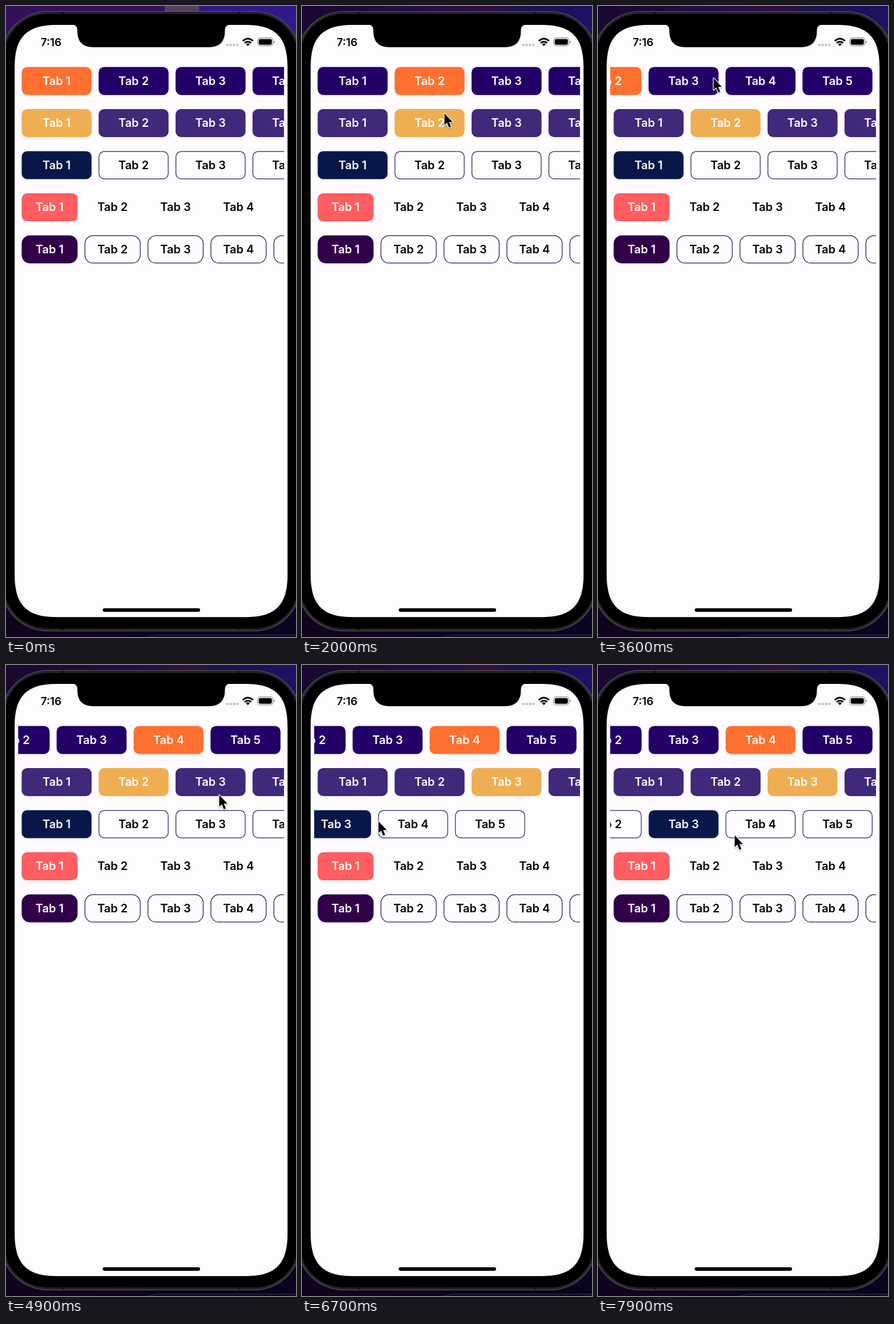
These frames come from a looping animation (508 by 1102 pixels, 8000 ms). An HTML page:

```html
<!DOCTYPE html>
<html lang="en">
<head>
<meta charset="utf-8">
<title>Tab rows</title>
<style>
  html, body { margin: 0; width: 100%; height: 100%; overflow: hidden; background: #0b0418; }
  svg { display: block; width: 508px; height: 1102px; }
  text { font: 600 20px Inter, "Noto Sans", sans-serif; text-anchor: middle; }
</style>
</head>
<body>
<svg viewBox="0 0 508 1102" xmlns="http://www.w3.org/2000/svg">
  <defs>
    <linearGradient id="sky">
      <stop offset="0" stop-color="#190730"/>
      <stop offset=".45" stop-color="#270b48"/>
      <stop offset=".65" stop-color="#330f42"/>
      <stop offset=".75" stop-color="#19124e"/>
      <stop offset="1" stop-color="#1f1066"/>
    </linearGradient>
    <linearGradient id="floor">
      <stop offset="0" stop-color="#12041f"/>
      <stop offset="1" stop-color="#0b0420"/>
    </linearGradient>
    <clipPath id="view"><rect x="21.3" y="90" width="465.7" height="380"/></clipPath>
    <filter id="soft" x="-50%" y="-50%" width="200%" height="200%">
      <feDropShadow dx="0" dy="1.5" stdDeviation="1.3" flood-opacity=".35"/>
    </filter>
  </defs>

  <!-- desktop -->
  <rect width="508" height="551" fill="url(#sky)"/>
  <rect y="551" width="508" height="551" fill="url(#floor)"/>
  <g id="glow">
    <rect width="278" height="60" fill="#35105a"/>
    <rect x="278" width="60" height="9" fill="#55405f"/>
    <rect x="338" width="170" height="60" fill="#32198a"/>
  </g>
  <path d="M248 1103Q258 1098.5 274 1098.5H508V1103Z" fill="#0c0a20" stroke="#302b52"/>

  <!-- phone -->
  <rect x="-8.5" y="9.5" width="525" height="1082" rx="82" fill="#232325" stroke="#59595c" stroke-width="1.2"/>
  <path d="M97 10h5v4h-5zM406 10h5v4h-5zM97 1087h5v4h-5zM406 1087h5v4h-5z" fill="#141416"/>
  <rect x="-4" y="14" width="516" height="1073" rx="77"/>
  <path id="screen" fill="#fefcff"/>
  <path d="M116 32.5Q125 33 125 42V44Q125 72 153 72H355Q383.5 72 383.5 44V42Q383.5 33 393 32.5Z"/>

  <!-- status bar -->
  <text x="79" y="70" style="font-size:19px">7:16</text>
  <path d="M388 66v4m5.7-4v4m5.7-4v4m5.7-4v4" stroke="#c6c4c8" stroke-width="4"/>
  <path d="M414.7 61.2Q423.7 52.8 432.7 61.2M418 64.7Q423.7 59.7 429.4 64.7" fill="none" stroke="#000" stroke-width="3"/>
  <path d="M420.3 66.5Q423.7 63.8 427.1 66.5L423.7 70.2Z"/>
  <rect x="440.7" y="55.7" width="27" height="14" rx="4.3" fill="none" stroke="#8f8d92" stroke-width="1.2"/>
  <rect x="442.7" y="57.7" width="23" height="10" rx="2.6"/>
  <path d="M469.2 60.5Q471 61 471 62.7T469.2 65Z" fill="#8f8d92"/>
  <rect x="169.5" y="1051.7" width="170.5" height="6.3" rx="3.15"/>

  <g id="rows" clip-path="url(#view)"></g>
  <path id="cursor" d="M0 0V20.5L4.6 16.2L8 25L11.6 23.5L8.2 15.2H14.4Z"
    stroke="#fff" stroke-width="2.4" paint-order="stroke" stroke-linejoin="round" filter="url(#soft)"/>
</svg>
<script>
const LOOP = 8000, STEP = 100;
const PT = 1.2256;                 // pixels per layout point
const LEFT = 27.4, TOP = 106.4;
const GAP = 10 * PT, TAB_H = 40 * PT, ROW_H = 60 * PT;
const MAX_SCROLL = 170 * PT;
const RUBBER = 0.66, SETTLE = 120;
const $ = id => document.getElementById(id);

const ROWS = [
  { on: "#ff7030", off: "#230067", ink: "#fff" },
  { on: "#f0ae52", off: "#40287a", ink: "#fff" },
  { on: "#071747", line: "#17245c" },
  { on: "#ff5d60", w: 80 },
  { on: "#320049", w: 80, r: 12, line: "#17194f" }
];

// The pointer glides between these; a drag lasts until the next stop.
const STOPS = [
  { t: 200, x: 530, y: 330 },
  { t: 900, x: 232, y: 136, act: "tap" },
  { t: 1700, x: 248, y: 189, act: "tap" },
  { t: 2000, x: 249.5, y: 187.5 },
  { t: 2400, x: 414, y: 128, act: "drag" },
  { t: 2900, x: 158.5, y: 120 },
  { t: 3600, x: 202.5, y: 126 },
  { t: 4200, x: 285, y: 139, act: "tap" },
  { t: 4900, x: 373.5, y: 227 },
  { t: 5200, x: 368, y: 212, act: "tap" },
  { t: 5900, x: 355, y: 278, act: "tap" },
  { t: 6250, x: 479, y: 276, act: "drag" },
  { t: 6700, x: 134, y: 273 },
  { t: 7800, x: 239.5, y: 297.5 }
];

const smooth = p => p * p * (3 - 2 * p);
const rowAt = y => Math.floor((y - TOP) / ROW_H);

function pointer(t) {
  const i = STOPS.findIndex(s => s.t > t);
  if (i < 0) return STOPS[STOPS.length - 1];
  if (i === 0) return STOPS[0];
  const a = STOPS[i - 1], b = STOPS[i];
  const e = smooth((t - a.t) / (b.t - a.t));
  return { x: a.x + (b.x - a.x) * e, y: a.y + (b.y - a.y) * e };
}

// Follows the drag, resists past the end, then springs back.
function scrollOf(n, t) {
  const i = STOPS.findIndex(s => s.act === "drag" && rowAt(s.y) === n && s.t <= t);
  if (i < 0) return 0;
  const end = STOPS[i + 1].t;
  const pull = STOPS[i].x - pointer(Math.min(t, end)).x;
  const over = Math.max(0, pull - MAX_SCROLL) * RUBBER;
  return Math.min(pull, MAX_SCROLL) + over * Math.exp(-Math.max(0, t - end) / SETTLE);
}

function activeOf(n, t) {
  const tap = STOPS.filter(s => s.act === "tap" && rowAt(s.y) === n && s.t <= t).pop();
  return tap ? Math.floor((tap.x + scrollOf(n, tap.t) - LEFT) / ROWS[n].pitch) : 0;
}

function add(tag, attrs, parent) {
  const el = document.createElementNS("http://www.w3.org/2000/svg", tag);
  for (const k in attrs) el.setAttribute(k, attrs[k]);
  return parent.appendChild(el);
}

// Rounded rectangle whose corners ease into the sides.
function softRect(x, y, w, h, c, k) {
  return `M${x + c} ${y}h${w - 2 * c}c${c - k} 0 ${c} ${k} ${c} ${c}` +
    `v${h - 2 * c}c0 ${c - k} ${-k} ${c} ${-c} ${c}` +
    `h${2 * c - w}c${k - c} 0 ${-c} ${-k} ${-c} ${-c}` +
    `v${2 * c - h}c0 ${k - c} ${k} ${-c} ${c} ${-c}Z`;
}

function build() {
  $("screen").setAttribute("d", softRect(15.2, 33, 478, 1034.3, 74, 21));
  ROWS.forEach((row, n) => {
    const { w = 100, r = 8, line } = row;
    const width = w * PT, y = TOP + n * ROW_H, inset = line ? PT / 2 : 0;
    row.pitch = width + GAP;
    row.g = add("g", {}, $("rows"));
    row.tabs = Array.from({ length: 5 }, (_, i) => {
      const x = LEFT + i * row.pitch;
      const box = add("rect", {
        x: x + inset, y: y + inset, width: width - 2 * inset, height: TAB_H - 2 * inset,
        rx: r * PT - inset, stroke: line || "none", "stroke-width": PT
      }, row.g);
      const label = add("text", { x: x + width / 2, y: y + 31.3 }, row.g);
      label.textContent = "Tab " + (i + 1);
      return { box, label };
    });
  });
}

function draw(t) {
  ROWS.forEach((row, n) => {
    const active = activeOf(n, t);
    row.tabs.forEach(({ box, label }, i) => {
      box.setAttribute("fill", i === active ? row.on : row.off || "none");
      label.setAttribute("fill", i === active ? "#fff" : row.ink || "#000");
    });
    row.g.setAttribute("transform", `translate(${-scrollOf(n, t)} 0)`);
  });
  const { x, y } = pointer(t);
  $("cursor").setAttribute("transform", `translate(${x} ${y})`);
  $("glow").setAttribute("opacity", Math.max(0, 1 - t / 500));
}

build();
const start = performance.now();
function tick() {
  const t = (performance.now() - start) % LOOP;
  draw(Math.floor(t / STEP) * STEP);
  requestAnimationFrame(tick);
}
tick();
</script>
</body>
</html>
```
